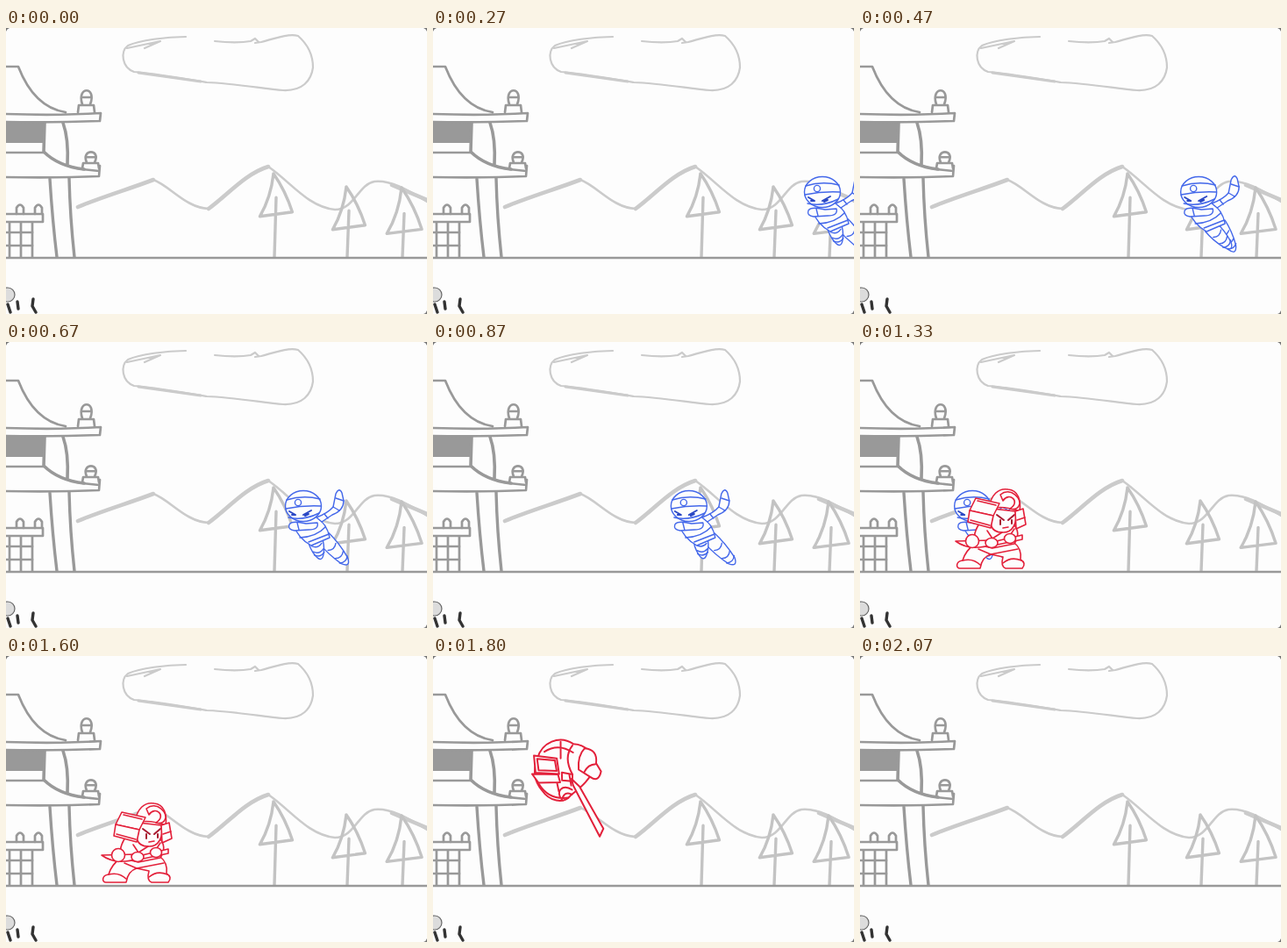
Recreate the animation shown at these times as an HTML page. Size 480 px wide and 326 px high, loop 2870 ms.

```html
<!DOCTYPE html>
<html>
<head>
<meta charset="utf-8">
<style>
html, body { margin: 0; width: 100%; height: 100%; overflow: hidden; background: #fdfdfd; }
svg { display: block; width: 100vw; height: 100vh; stroke-linecap: round; stroke-linejoin: round; }
.line { fill: none; }
.far { stroke: #cbcbcb; fill: none; }
#trees { stroke: #c3c3c3; stroke-width: 3.4; fill: none; }
#temple { stroke: #999; stroke-width: 2.7; fill: none; }
#ninja { stroke: #4468ea; stroke-width: 1.4; fill: #fdfdfd; }
#samurai { stroke: #e3203a; stroke-width: 1.6; fill: #fdfdfd; }
</style>
</head>
<body>
<svg viewBox="0 0 480 326" preserveAspectRatio="none">
  <rect width="480" height="326" fill="#fdfdfd"/>

  <!-- cloud -->
  <g class="far" stroke-width="2.2">
    <path d="M205 10C182 10 153 14 139 20C130 27 132 45 146 50C172 52 206 58 229 62C258 63 293 69 316 71C338 72 348 60 350 45C350 28 341 16 333 9C322 6 306 12 291 16L284 17"/>
    <path d="M138 23L176 15L158 23M238 15C255 17 268 17 279 15L284 12L288 16"/>
    <path stroke-width="3" d="M151 51L222 61"/>
  </g>

  <!-- mountains -->
  <g class="far">
    <path stroke-width="2.6" d="M168 173C187 180 205 205 231 206M299 158C323 174 344 204 375 207C397 207 402 178 420 175C440 173 460 186 480 198"/>
    <path stroke-width="4.6" d="M82 204C108 193 139 184 168 173M231 206C253 190 273 166 299 158M440 179L480 196"/>
  </g>

  <g id="trees"></g>

  <g id="temple">
    <path fill="#999" stroke="none" d="M0 107H44V131H0Z"/>
    <path d="M0 44H14C21 62 35 91 68 96M0 98Q60 100 108 97L107 106Q50 108 0 107"/>
    <path stroke-width="3.6" d="M44 108L43 141C55 153 72 159 89 161M65 108C70 122 71 138 70 156"/>
    <path d="M0 142H43M0 170Q60 171 106 169L107 157M87 161L106 163"/>
    <path stroke-width="3.4" d="M50 172Q53 220 58 261M72 171Q73 215 78 261"/>
    <path d="M0 212H42V221H0M0 233H30M0 248H30"/>
    <path d="M0 262H480"/>
    <g id="parts"></g>
  </g>

  <!-- lower corner sketch -->
  <circle cx="2" cy="304" r="8" fill="#dcdcdc" stroke="#666" stroke-width="1.2"/>
  <path class="line" stroke="#333" stroke-width="3.4" d="M2 315L5 324M13 312L14 320M31 309L30 317L34 324"/>

  <g id="ninja">
    <g id="legs"></g>
    <path d="M-12 20Q-6 37 9 45L30 36Q27 20 14 12Z"/>
    <path class="line" d="M-4 36Q15 35 25 24M6 41L29 32"/>
    <path d="M15 13Q28 8 34 1L37 -14Q41 -22 44 -15L46 -6Q46 5 33 10L21 18Z"/>
    <path class="line" d="M34 1L41 5M37 -9L46 -6M24 9L28 14"/>
    <ellipse rx="20.5" ry="17.5"/>
    <path class="line" d="M-19 -7Q0 -13 19 -8M-20 3Q0 -1 20 0M-17 13Q0 17 18 8"/>
    <circle cx="-6" cy="-4" r="3.6"/>
    <path class="line" stroke="#2b48c4" stroke-width="2" d="M-16 6L-9 10M9 5L0 10M-13 10H-10M2 11L6 9"/>
    <path d="M-16 21Q-13 16 3 20L16 19Q18 27 6 27L-10 28Q-18 27 -16 21Z"/>
    <path class="line" d="M-7 19L-5 27"/>
  </g>

  <g id="samurai">
    <g id="air" transform="translate(-135 -88)" stroke-width="2">
      <path d="M102 88C99 70 113 53 132 56C146 50 158 57 164 68C169 85 157 104 154 111C151 123 135 127 122 119C108 113 103 102 102 88Z"/>
      <path d="M146 55Q160 50 165 65L174 71Q177 84 166 82L150 80Q142 66 146 55Z"/>
      <path class="line" d="M106 78Q116 62 136 65M118 60L126 77M132 58Q128 75 146 88M165 66Q157 70 157 80M134 104L140 112"/>
      <path d="M97 87L122 79L132 94L107 104Z"/>
      <path d="M104 107L131 95L137 102L115 113Z"/>
      <path class="line" d="M102 89L121 82L128 92L109 100ZM116 114Q134 126 153 114M153 104C140 102 136 114 147 119M155 109Q146 108 147 119"/>
      <path d="M134 91L146 88L149 95L138 99Z"/>
      <path d="M147 93L159 97L204 129V139L152 99Z"/>
      <path class="line" d="M143 90L150 100"/>
    </g>
    <g id="stand" transform="translate(-155 -215)">
      <path d="M132 229Q120 238 117 249C109 250 109 258 114 258H137Q139 245 149 242L163 245Q160 256 166 258H185Q190 252 183 248Q185 236 175 228Z"/>
      <path class="line" d="M117 249Q129 246 137 254M163 252Q172 244 184 249M135 236L149 242L180 236"/>
      <path d="M136 207Q126 223 134 231L151 235L176 230Q184 217 175 208Z"/>
      <path d="M151 190C146 207 149 217 162 217C174 218 180 206 177 193Z"/>
      <path d="M147 190C149 174 158 166 169 168C180 169 184 180 182 193Q164 186 147 190Z"/>
      <path d="M160 174C172 164 186 180 181 187Q178 192 171 190C184 182 170 170 163 181Z"/>
      <path class="line" d="M151 188L147 196L151 202M163 212L169 211M145 215L151 224L162 217M176 213L170 222"/>
      <path class="line" stroke="#a81a30" stroke-width="2" d="M156 197L164 203M176 197L169 203M160 203V208M173 203V207"/>
      <path d="M132 178L159 184L152 198L125 192Z"/>
      <path d="M125 192L152 198L149 212L123 205Z"/>
      <path d="M177 193L186 190L189 208L178 213Z"/>
      <path class="line" d="M134 181L155 186M126 203L148 209M179 203L188 200"/>
      <path d="M150 226L109 227Q125 239 151 231Z"/>
      <path d="M151 228L185 220V225L152 232Z"/>
      <ellipse cx="128" cy="227" rx="7.5" ry="7.5"/>
      <ellipse cx="150" cy="229" rx="7" ry="5.5"/>
      <ellipse cx="171" cy="224" rx="6.5" ry="5.5"/>
    </g>
  </g>

  <path fill="#777" d="M0 0H4Q1 1 0 4ZM480 0H476Q479 1 480 4ZM480 326H476Q479 325 480 322Z"/>
</svg>

<script>
const LOOP = 2870, STEP = 1000 / 15;
const MEET = 17, LAND = 20, LIFTOFF = 25, RUN_END = 23;
const $ = id => document.getElementById(id);
const path = d => `<path d="${d}"/>`;

function tree(x, top, w) {
  const base = top + w * 1.2;
  return path(`M${x} ${top}Q${x - 3} ${top + w * .7} ${x - w * .4} ${base + 2}
    L${x + w * .55} ${base - 3}Q${x + w * .35} ${top + w * .5} ${x} ${top}
    M${x + 3} ${top + w * .7}L${x + 1} 261`);
}

function lantern(x, base, s) {
  return path(`M${x - 10} ${base}L${x - 9} ${base - 8 * s}H${x + 8}L${x + 9} ${base}
    M${x - 5} ${base - 9 * s}C${x - 12} ${base - 30 * s} ${x + 12} ${base - 30 * s} ${x + 4} ${base - 9 * s}
    M${x - 4} ${base - 17 * s}H${x + 4}`);
}

const knob = x => path(`M${x - 4} 212V205Q${x} 198 ${x + 4} 205V212`);
const bar = x => path(`M${x} 222V261`);

$('trees').innerHTML = tree(305, 166, 39) + tree(388, 181, 39) + tree(451, 182, 42);
$('parts').innerHTML = lantern(92, 96, 1) + lantern(97, 160, .75) +
  [16, 37].map(knob).join('') + [4, 17, 30].map(bar).join('');

function leg(hx, hy, fx, fy) {
  const len = Math.hypot(fx - hx, fy - hy);
  const turn = Math.atan2(fy - hy, fx - hx) * 180 / Math.PI;
  const cuts = [.4, .75, .95].map(p => `M${len * p} -6Q${len * p + 5} 0 ${len * p} 6`).join('');
  return `<g transform="translate(${hx} ${hy}) rotate(${turn})">
    <path d="M0 -8Q${len * .5} -9 ${len} -5Q${len + 11} 0 ${len} 5Q${len * .5} 9 0 8Z"/>
    <path class="line" d="${cuts}"/></g>`;
}

// Steady run with a slow surge, then a dash out to the left.
function drawNinja(k) {
  const on = k >= 1 && k <= RUN_END;
  $('ninja').style.display = on ? '' : 'none';
  if (!on) return;
  const surge = 7 * Math.sin((k - 10) * Math.PI / 7);
  const dash = 6 * Math.max(0, k - MEET - 1) ** 2;
  const x = 213 + 18 * (MEET - k) + surge - dash;
  const spread = Math.abs(Math.sin((k - MEET) * Math.PI / 10));
  $('ninja').setAttribute('transform', `translate(${x} 187)`);
  $('legs').innerHTML =
    leg(23, 36, 38 + 11 * spread, 63 - spread) +
    leg(13, 39 - 3 * spread, 33 - 18 * spread, 60 - 6 * spread);
}

// The leap in and the leap out follow the same arc, u steps from the ground.
function drawSamurai(k) {
  const u = Math.max(LAND - k, k - LIFTOFF, 0);
  const on = u < 6;
  $('samurai').style.display = on ? '' : 'none';
  if (!on) return;
  $('air').style.display = u ? '' : 'none';
  $('stand').style.display = u ? 'none' : '';
  const turn = u ? (3 - u) * 25 : 0;
  $('samurai').setAttribute('transform',
    `translate(${155 - .74 * u ** 3} ${215 - 42.3 * u}) rotate(${turn})`);
}

const start = performance.now();
let last = -1;
function tick() {
  const t = (performance.now() - start) % LOOP;
  const k = Math.floor((t + 4) / STEP);
  if (k !== last) {
    drawNinja(k);
    drawSamurai(k);
    last = k;
  }
  requestAnimationFrame(tick);
}
tick();
</script>
</body>
</html>
```
